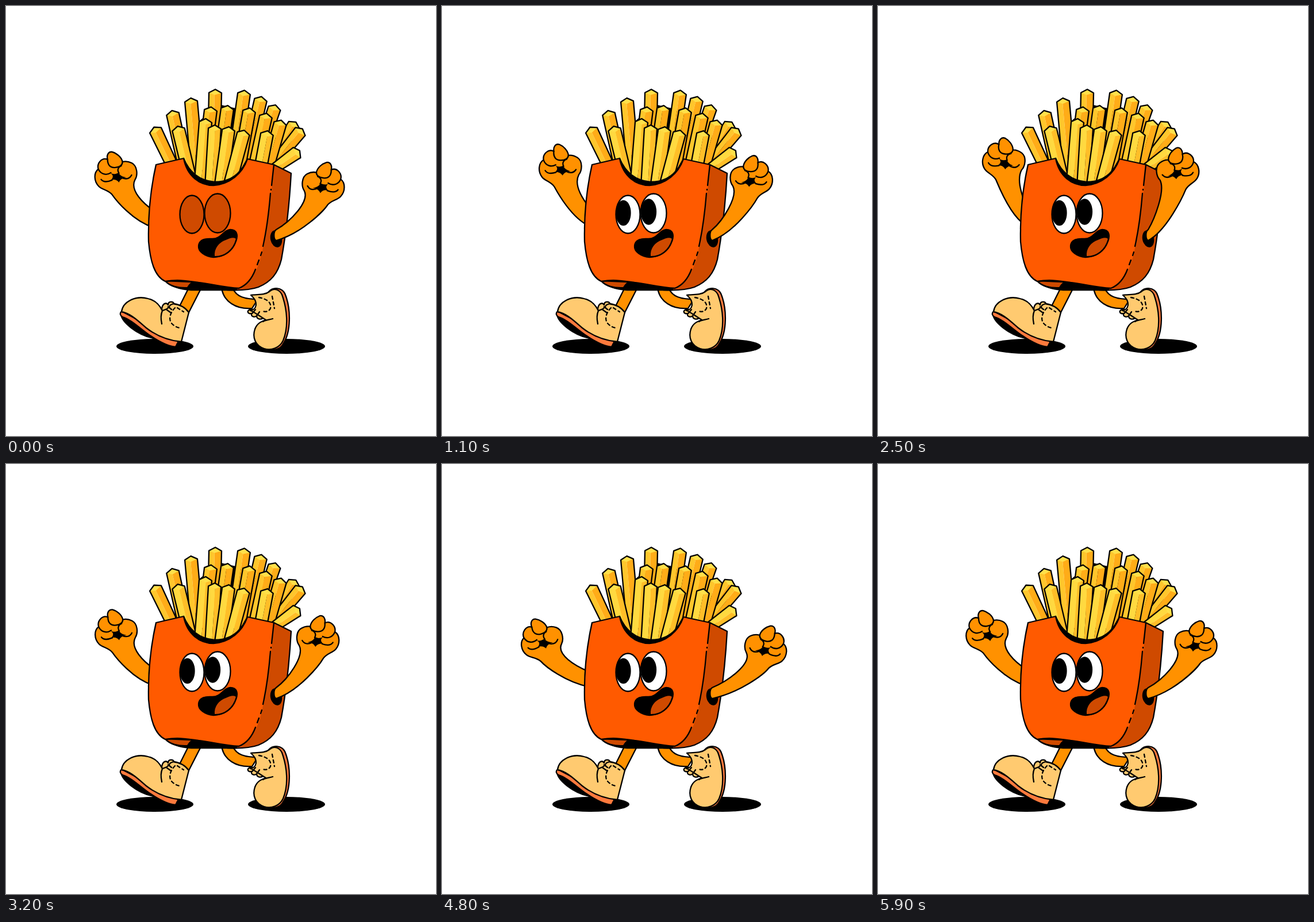
These frames come from a looping animation (748 px wide and 748 px high, 6 s). An HTML page:

```html
<!DOCTYPE html>
<html lang="en">
<head>
<meta charset="utf-8">
<title>Walking fries</title>
<style>
  html, body { margin: 0; width: 100%; height: 100%; overflow: hidden; background: #fff; }
  svg { display: block; width: 100%; height: 100%; }
  .ink { stroke: #000; stroke-width: 2.3; stroke-linejoin: round; stroke-linecap: round; }
  .line { fill: none; }
  .flat { stroke: none; }
  .limb { fill: #ff9100; }
  .front { fill: #ff5a00; }
  .side { fill: #cf4a00; }
  .shoe { fill: #ffca70; }
  .sole { fill: #ff7a3d; }
  .white { fill: #fff; }
</style>
</head>
<body>
<svg viewBox="0 0 748 748">
  <ellipse cx="259" cy="592" rx="67" ry="13"/>
  <ellipse cx="488" cy="592" rx="67" ry="13"/>

  <g id="leftArm"></g>

  <g class="ink">
    <path class="limb" d="M319 488L302 522L317 535L340 490Z"/>
    <path class="limb" d="M375 490C378 514 400 528 428 526L438 510C416 510 401 506 395 492Z"/>
    <!-- left shoe -->
    <path d="M200 536C201 550 228 572 256 578L246 566Z"/>
    <path class="sole" d="M201 531C197 535 199 539 203 541C219 546 234 562 252 574C267 584 283 592 295 593L300 583Z"/>
    <path class="shoe" d="M271 527C272 517 279 515 282 520C282 513 291 513 293 519L285 534L272 537Z"/>
    <path class="shoe" d="M201 532C203 514 226 503 247 509C261 512 268 522 272 530C278 528 282 527 286 520L291 518C302 519 312 525 318 533L305 584C283 582 262 574 244 560C231 549 216 534 201 532Z"/>
    <path class="line" d="M272 530C269 537 269 544 271 553M279 528L286 533M282 523L288 528"/>
    <path class="line" stroke-dasharray="5 5" d="M294 525C285 534 282 546 289 553C294 558 300 560 304 560M298 525L309 532"/>
    <!-- right shoe -->
    <path class="sole" d="M457 497C465 488 480 490 485 500C496 526 496 567 482 588C477 597 466 600 459 596Z"/>
    <path class="shoe" d="M424 528C418 531 421 536 427 535C426 541 433 542 436 539C436 545 443 546 447 543L452 530Z"/>
    <path class="shoe" d="M426 503C436 501 448 504 458 497C467 489 476 494 480 502C489 527 492 558 482 582C476 595 461 600 449 596C434 591 428 577 433 562C437 551 446 548 452 546C443 541 435 534 424 529C436 530 440 515 426 503Z"/>
    <path class="line" d="M447 549C452 546 458 546 464 544M434 528L428 535M441 532L436 539"/>
    <path class="line" stroke-dasharray="5 5" d="M440 507C456 510 462 517 460 526C457 532 452 533 444 530M463 505L467 526"/>
  </g>

  <path d="M334 202L348 190L374 172L400 178L432 195L462 195L470 215L467 272L420 302L320 304L309 266L331 258Z"/>
  <g id="fries" class="ink"></g>

  <!-- carton -->
  <g class="ink">
    <path class="side" d="M466 276L496 291C493 345 487 397 479 441C473 465 461 480 439 489C425 494 405 495 385 494L400 480Z"/>
    <path d="M277 478C284 487 302 493 322 494L400 494L405 486Z"/>
    <path class="side" d="M277 478C284 487 300 491 316 490C318 486 321 483 325 480Z"/>
    <path d="M309 265C315 295 337 312 361 313C390 311 410 291 420 266L412 280C398 302 378 306 362 306C340 304 320 292 309 265Z"/>
    <path class="front flat" d="M261 276L309 265C315 297 338 312 361 312C389 310 411 292 420 266L466 276C462 330 455 385 445 430C438 460 426 482 405 491C380 490 360 484 335 481C310 477 295 476 277 479C258 470 251 443 248 410C247 365 251 320 261 276Z"/>
    <path class="line" d="M466 276L420 266C411 292 389 310 361 312C338 312 315 297 309 265L261 276C251 320 247 365 248 410C251 443 258 470 277 479C295 476 310 477 335 481C360 484 380 490 405 491"/>
    <path class="line" d="M466 276L462 312M461 319v1M460 326C457 362 453 391 447 418M445 428L443 434M440 442L437 450M434 458C428 474 418 486 405 491"/>
  </g>

  <!-- face -->
  <g class="ink">
    <g id="lids" class="side">
      <ellipse cx="323.500" cy="362.500" rx="21" ry="33"/>
      <ellipse cx="368" cy="360.500" rx="22.500" ry="34"/>
    </g>
    <g id="pupils">
      <ellipse cx="315.500" cy="360" rx="12" ry="21"/>
      <ellipse cx="359.500" cy="358" rx="12.500" ry="21.500"/>
    </g>
    <path d="M335 417C336 406 346 404 359 405C375 405 377 390 390 389C402 389 404 399 400 409C394 428 377 437 361 437C346 436 334 427 335 417Z"/>
    <path class="side" d="M362 436C360 420 371 410 382 406C392 401 399 401 401 405C396 425 380 437 362 436Z"/>
  </g>

  <ellipse cx="470" cy="405" rx="10" ry="15" transform="rotate(-12 470 405)"/>
  <g id="rightArm"></g>
</svg>

<script>
const byId = id => document.getElementById(id);

// One fry from its top point; lean is the sideways shift per unit of height.
function fry(x, y, lean, width, bottom, light, shade, fold) {
  const len = Math.hypot(lean, 1), ux = lean / len, uy = -1 / len, h = width / 2;
  const top = (across, along = 0) => `${x - uy * across + ux * along} ${y + ux * across + uy * along}`;
  const foot = across => `${x - lean * (bottom - y) + across} ${bottom}`;
  const strip = (l, r) => `M${foot(l)}L${top(l)}L${top(r)}L${foot(r)}Z`;
  return `<path class="flat" fill="${light}" d="${strip(-h, fold * h)}"/>
    <path class="flat" fill="${shade}" d="${strip(fold * h, h)}"/>
    <path class="flat" fill="#ffe04a" d="M${top(-h)}L${top(0, 6)}L${top(h)}L${top(fold * h, -4)}Z"/>
    <path class="line" d="M${foot(-h)}L${top(-h)}L${top(0, 6)}L${top(h)}L${foot(h)}"/>`;
}

// The two rear rows follow arches and fan out from the middle.
function arch(xs, crest, curve, leanAt) {
  return xs.map(x => {
    const y = crest + curve * (x - 385) ** 2;
    return fry(x, y, leanAt(x) / (276 - y), 22, 285, '#ffc62c', '#ffac18', -.1);
  });
}
const frontTops = [[300, 215, -.24], [347, 202, .08], [363, 213, .06], [387, 216, .14],
  [413, 222, .27], [454, 223, .19], [506, 255, 1.4]];
byId('fries').innerHTML = [
  ...arch([260, 290, 322, 364, 414, 443, 467, 501, 512], 149, .0043, x => .3 * (x - 355)),
  ...arch([356, 385, 423, 452, 477], 179, .003, x => .07 * x - 13),
  ...frontTops.map(([x, y, lean]) => fry(x, y, lean, 22, 306, '#ffd940', '#ffbe28', .1))
].join('');

// Fist outline around the palm, from the thumb side to the little finger.
const fist = 'C34,-4 33,-20 23,-25C17,-28 11,-28 7,-27C5,-36 -4,-42 -11,-44C-18,-45 -21,-38 -19,-31' +
  'C-29,-35 -38,-24 -35,-14C-43,-8 -43,7 -34,16C-28,22 -18,22 -11,30';
const creases = 'M-35,-14C-30,-4 -20,-3 -13,-8M-19,-31C-19,-20 -13,-16 -5,-17C2,-18 7,-21 7,-27' +
  'M-30,4C-26,9 -18,8 -11,5M6,1C14,4 20,2 23,-4M1,-7C-3,-13 0,-18 5,-20';
const knot = 'M-14,-7C-9,-5 -5,-5 0,-8C4,-2 8,-1 14,0C7,1 3,4 1,9C-2,5 -7,3 -13,5C-8,0 -9,-4 -14,-7Z';

const mix = (a, b, k) => a + (b - a) * k;

// 1 with the arm raised at 2400 ms, 0 with it lowered at 4000 ms: slow up, quick down.
function swing(t, power) {
  const since = (t + 2000) % 6000;
  return since < 4400 ? (since / 4400) ** power : 1 - (since - 4400) / 1600;
}

const leftArm = { id: 'leftArm', flip: 1, power: .9, shoulder: 256,
  low: { x: 166, y: 323, angle: -13, top: 366, bottom: 390 },
  high: { x: 226, y: 272, angle: 14, top: 344, bottom: 380 } };
const rightArm = { id: 'rightArm', flip: -1, power: 1.5, shoulder: 470,
  low: { x: 562, y: 328, angle: 4, top: 389, bottom: 408 },
  high: { x: 515, y: 290, angle: -14, top: 389, bottom: 408 } };

function drawArm({ id, flip, power, shoulder, low, high }, t) {
  const k = swing(t, power);
  const [x, y, angle, top, bottom] = Object.keys(low).map(key => mix(low[key], high[key], k));
  const c = Math.cos(angle * Math.PI / 180), s = Math.sin(angle * Math.PI / 180);
  const place = (px, py) => [x + flip * px * c - py * s, y + flip * px * s + py * c];
  const map = d => d.replace(/(-?\d+),(-?\d+)/g, (_, px, py) => place(+px, +py).join());
  const thumb = place(29, 4), wrist = place(-11, 30);
  const near = (sy, end) => [mix(shoulder, end[0], .5), mix(sy, end[1], .2)];
  const outline = `M${shoulder},${top}C${near(top, thumb)} ${thumb[0] - 10 * flip},${thumb[1] + 19} ${thumb}` +
    map(fist + 'C-4,40 ') + `${near(bottom, wrist)} ${shoulder},${bottom}` +
    `C${shoulder - 5},${bottom - 2} ${shoulder - 5},${top + 3} ${shoulder},${top}Z`;
  byId(id).innerHTML = `<path class="ink limb" d="${outline}"/>
    <path class="ink line" d="${map(creases)}"/><path d="${map(knot)}"/>`;
}

function draw(now) {
  const t = Math.floor(now % 6000 / 100) * 100;
  drawArm(leftArm, t);
  drawArm(rightArm, t);
  const shut = t < 200;
  byId('lids').setAttribute('class', shut ? 'side' : 'white');
  byId('pupils').style.display = shut ? 'none' : '';
}

const start = performance.now();
function tick() {
  draw(performance.now() - start);
  requestAnimationFrame(tick);
}
tick();
</script>
</body>
</html>
```
